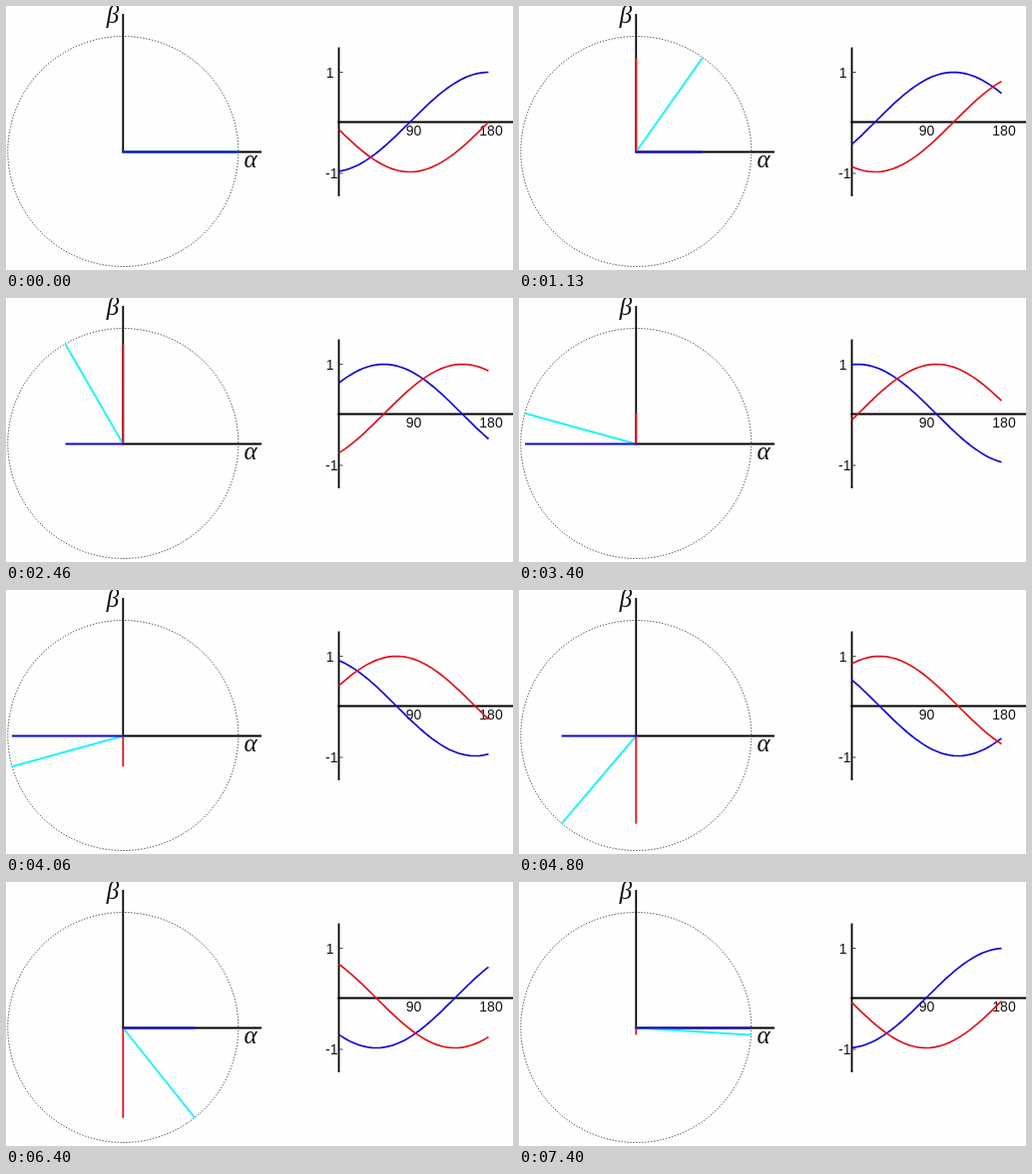
Animation, 508 px wide and 265 px high, one loop 7.43 s. Source, as an HTML page with a canvas:

```html
<!DOCTYPE html>
<html lang="en">
<head>
<meta charset="utf-8">
<title>Rotating vector and its components</title>
<style>
  html, body { margin: 0; width: 100%; height: 100%; overflow: hidden; background: #fefefe; }
  canvas { display: block; }
</style>
</head>
<body>
<canvas id="stage" width="508" height="265"></canvas>
<script>
const ctx = document.getElementById('stage').getContext('2d');
const LOOP = 7430, STEPS = 105, HISTORY = 50;
const TURN = 2 * Math.PI / STEPS;
const O = { x: 117.3, y: 146.5, r: 115.5 };
const PLOT = { x: 333.5, y: 116.5, w: 150, h: 50 };
const BLACK = '#000', BLUE = '#1208d6', RED = '#e0101c', CYAN = '#22f4fa';

function path(points, color, width = 1.8) {
  ctx.beginPath();
  points.forEach(([x, y]) => ctx.lineTo(x, y));
  ctx.strokeStyle = color;
  ctx.lineWidth = width;
  ctx.stroke();
}

function label(text, x, y, font, align = 'center') {
  ctx.font = font;
  ctx.textAlign = align;
  ctx.fillStyle = '#111';
  ctx.fillText(text, x, y);
}

// Ticks last 60, 70 and 70 ms; the rotation skips about one tick in sixteen.
function stepAt(time) {
  const part = time % 200;
  const tick = 3 * Math.floor(time / 200) + (part >= 60) + (part >= 130);
  return Math.floor(tick * 15 / 16 + 0.4);
}

function drawVector(angle) {
  const x = O.x + O.r * Math.cos(angle), y = O.y - O.r * Math.sin(angle);

  ctx.setLineDash([1, 2]);
  ctx.beginPath();
  ctx.arc(O.x, O.y - 0.5, O.r, 0, 2 * Math.PI);
  ctx.strokeStyle = BLACK;
  ctx.lineWidth = 1;
  ctx.stroke();
  ctx.setLineDash([]);

  path([[O.x, 8], [O.x, 147.3]], BLACK);
  path([[O.x - 0.9, O.y], [256, O.y]], BLACK);
  path([[O.x, O.y], [x, y]], CYAN, 2);
  path([[O.x, O.y], [O.x, y]], RED);
  path([[O.x, O.y], [x, O.y]], BLUE);

  const greek = 'italic 25px "Liberation Serif", serif';
  label('β', 107, 17, greek);
  label('α', 245, 162, greek);
}

function drawPlot(step) {
  const { x, y, w, h } = PLOT;
  path([[x, 41.5], [x, 191]], BLACK);
  path([[x - 1, y], [508, y]], BLACK);
  path([[x, 66.5], [x + 4, 66.5]], '#444', 1);
  path([[x, 168], [x + 4, 168]], '#444', 1);

  const digits = '14px "Liberation Sans", Arial, sans-serif';
  label('1', 328.5, 71.5, digits, 'right');
  label('-1', 332.5, 173, digits, 'right');
  label('90', 408.5, 130, digits);
  label('180', 486, 130, digits);

  // The newest value enters at the right end.
  const curve = fn => Array.from({ length: HISTORY + 1 }, (_, i) =>
    [x + w * i / HISTORY, y - h * fn((step - HISTORY + i) * TURN)]);
  path(curve(Math.cos), BLUE, 1.7);
  path(curve(Math.sin), RED, 1.7);
}

function frame() {
  const step = stepAt(performance.now() % LOOP);
  ctx.fillStyle = '#fefefe';
  ctx.fillRect(0, 0, 508, 265);
  drawVector(step * TURN);
  drawPlot(step);
  requestAnimationFrame(frame);
}
frame();
</script>
</body>
</html>
```
